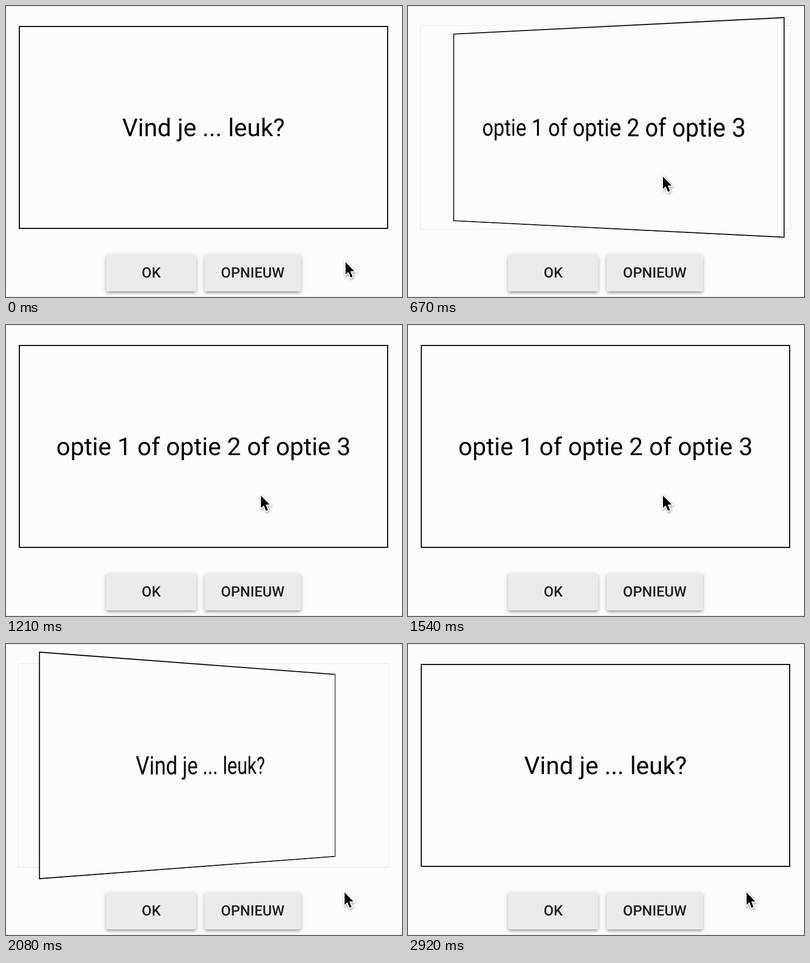
These frames come from a looping animation (772x568 px, 2960 ms). An HTML page:

```html
<!DOCTYPE html>
<html lang="nl">
<head>
<meta charset="utf-8">
<title>Flip card</title>
<style>
  html, body { margin: 0; width: 100%; height: 100%; overflow: hidden; background: #fcfcfc; }
  body { position: relative; font-family: Roboto, sans-serif; text-rendering: geometricPrecision; }
  #stage {
    position: absolute; left: 0; top: 0; width: 772px; height: 568px; overflow: hidden;
    box-sizing: border-box; border: solid #e0e0e0; border-width: 1px 0;
  }
  #scene {
    position: absolute; left: 23px; top: 36px; width: 720px; height: 396px;
    border: 2px solid #f1f1f1; perspective: 2000px;
  }
  #card { width: 100%; height: 100%; transform-style: preserve-3d; }
  .face {
    position: absolute; inset: 0; box-sizing: border-box; border: 2px solid #000;
    display: flex; align-items: center; justify-content: center;
    font-size: 48px; white-space: nowrap; background: #fcfcfc; backface-visibility: hidden;
  }
  .back { transform: rotateY(180deg); }
  #buttons {
    position: absolute; left: 0; top: 484px; width: 770px;
    display: flex; justify-content: center; gap: 16px;
  }
  .button {
    box-sizing: border-box; min-width: 176px; padding: 0 32px; border-radius: 4px;
    line-height: 72px; text-align: center; font-size: 28px; font-weight: 500;
    color: rgba(0, 0, 0, .87); background: #ebebeb;
    box-shadow: 0 2px 10px rgba(0, 0, 0, .2), 0 4px 4px rgba(0, 0, 0, .14),
                0 6px 2px -4px rgba(0, 0, 0, .12);
  }
  #cursor {
    position: absolute; left: 0; top: -1px; width: 24px; height: 36px; overflow: visible;
    filter: drop-shadow(1px 2px 2px rgba(0, 0, 0, .35));
  }
</style>
</head>
<body>
<div id="stage">
  <div id="scene">
    <div id="card">
      <div class="face">Vind je ... leuk?</div>
      <div class="face back">optie 1 of optie 2 of optie 3</div>
    </div>
  </div>
  <div id="buttons">
    <div class="button">OK</div>
    <div class="button">OPNIEUW</div>
  </div>
  <svg id="cursor">
    <path d="M0 0V24L5.5 19L9.8 29.8L13.6 28.2L9.3 17.6H17Z"
          stroke="#fff" stroke-width="4" paint-order="stroke"/>
  </svg>
</div>
<script>
  const LOOP = 2960, FIRST_STEP = 170, STEP = 540 / 13;
  const OUTSIDE = [662, 500], INSIDE = [497, 333], EXIT = [660, 485];
  const card = document.getElementById('card');
  const cursor = document.getElementById('cursor');

  const progress = (t, start, duration) => Math.min(1, Math.max(0, (t - start) / duration));
  const easeOut = u => 1 - (1 - u) ** 2;

  // The CSS "ease" curve: cubic-bezier(.25, .1, .25, 1)
  function ease(x) {
    let low = 0, high = 1, s;
    for (let i = 0; i < 24; i++) {
      s = (low + high) / 2;
      if (.75 * s * (1 - s) + s ** 3 < x) low = s; else high = s;
    }
    return .3 * s * (1 - s) ** 2 + 3 * s * s * (1 - s) + s ** 3;
  }

  // The picture advances 24 times a second after an initial pause.
  function stepTime(t) {
    const n = Math.floor((t - FIRST_STEP + 4) / STEP);
    return n < 0 ? 0 : FIRST_STEP + n * STEP;
  }

  function draw(now) {
    const t = stepTime(now % LOOP);
    const angle = 180 * (ease(progress(t, 226, 800)) - ease(progress(t, 1699, 780)));
    const enter = easeOut(progress(t, 134, 418));
    const leave = easeOut(progress(t, 1585, 268));
    const [x, y] = INSIDE.map((inside, i) => Math.round(
      inside + (OUTSIDE[i] - inside) * (1 - enter) + (EXIT[i] - inside) * leave));
    card.style.transform = `rotateY(${angle}deg)`;
    cursor.style.transform = `translate(${x}px, ${y}px)`;
  }

  const start = performance.now();
  function tick() {
    draw(performance.now() - start);
    requestAnimationFrame(tick);
  }
  tick();
</script>
</body>
</html>
```
